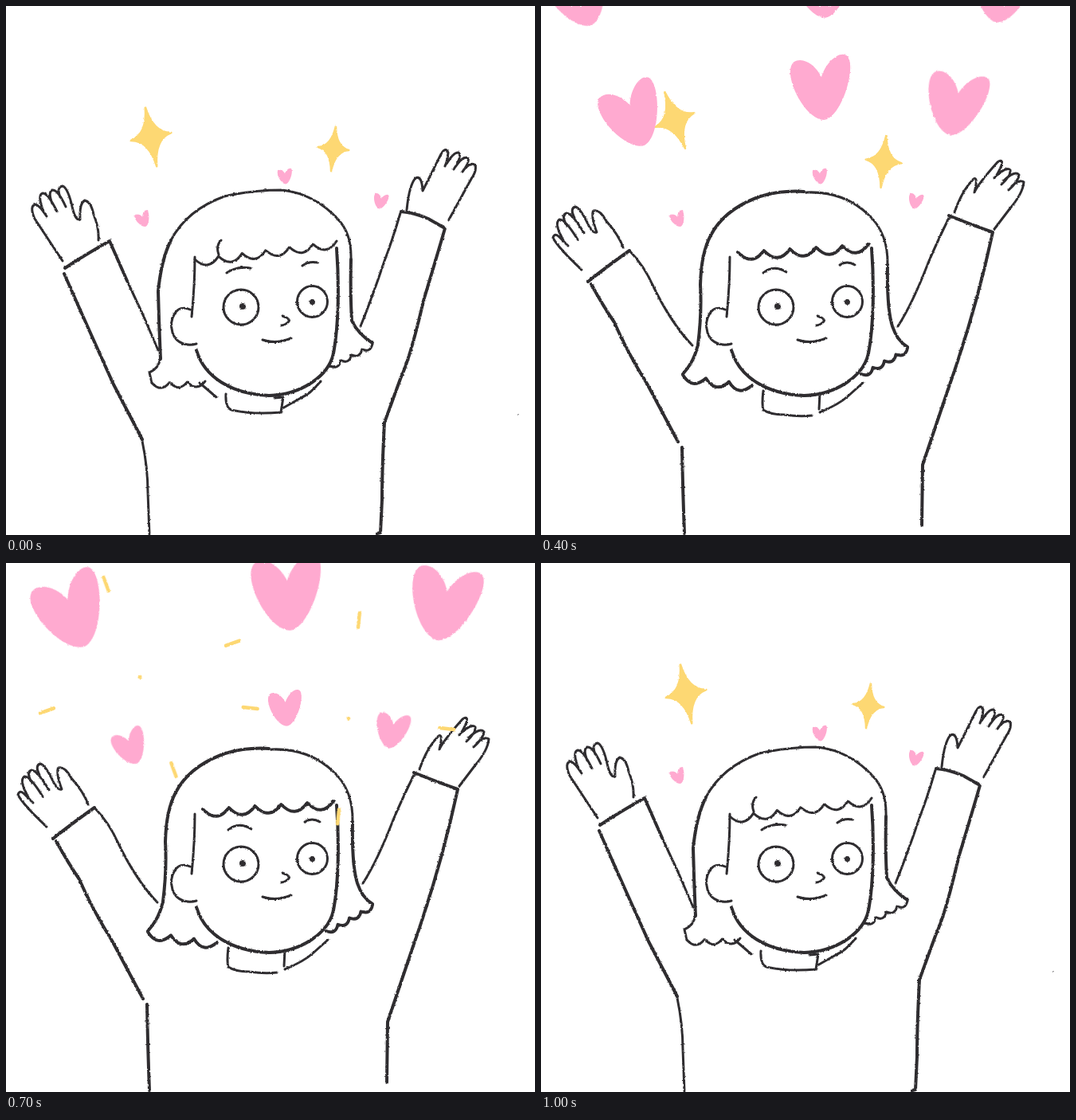
An HTML page for the animation above (1100 ms loop, 664 by 664 pixels).

```html
<!DOCTYPE html>
<html lang="en">
<head>
<meta charset="utf-8">
<title>Cheering with hearts and stars</title>
<style>
html, body { margin: 0; width: 100%; height: 100%; overflow: hidden; background: #fff; }
svg { display: block; width: 100vw; height: 100vh; }
.ink { fill: none; stroke: #2f2d30; stroke-width: 3; stroke-linecap: round; stroke-linejoin: round; }
.bold { stroke-width: 4; }
.pupil { fill: #2f2d30; stroke: none; }
.heart { fill: #ffaad0; }
.star { fill: #fdd873; stroke: #fdd873; stroke-width: 2.5; stroke-linejoin: round; }
.ray { stroke: #fdd873; stroke-width: 4.5; stroke-linecap: round; }
</style>
</head>
<body>
<svg viewBox="0 0 664 664">
  <filter id="rough" filterUnits="userSpaceOnUse" x="0" y="0" width="664" height="664" color-interpolation-filters="sRGB">
    <feTurbulence type="fractalNoise" baseFrequency=".35" numOctaves="2" seed="4"/>
    <feDisplacementMap in="SourceGraphic" scale="2.4" xChannelSelector="R" yChannelSelector="G"/>
  </filter>
  <g filter="url(#rough)">
    <g class="ink">
      <path d="M237 315Q237 350 233 390M231 381C214 373 204 393 209 410C214 425 229 427 239 424"/>
      <path class="bold" d="M239 432C249 466 283 487 330 489C370 488 405 465 411 436C418 400 418 345 415 304"/>
      <ellipse cx="295" cy="378" rx="22" ry="22"/><ellipse cx="384.500" cy="371" rx="19" ry="19.500"/>
      <circle class="pupil" cx="297" cy="377" r="4"/><circle class="pupil" cx="384.500" cy="371.500" r="3.500"/>
      <path d="M347 389Q357 393 355 396Q350 401 345 401M322 419Q338 425 358 417"/>
    </g>
    <g class="ink pose">
      <!-- hair and brows -->
      <path class="bold" d="M194 443Q192 400 191 358Q195 318 207 294M433 318Q432 360 434 395Q442 412 460 423"/>
      <path d="M207 294Q227 256 274 239Q308 231 347 231Q388 236 417 268Q434 286 433 318"/>
      <path d="M194 441Q192 455 180 460L183 473M267 312Q263 301 270 294M277 335Q290 326 307 329M372 326Q380 320 391 322"/>
      <path class="scallop" data-edge="237 318 415 295 6"/>
      <path class="scallop" data-edge="183 473 250 471 3"/>
      <path class="scallop" data-edge="407 452 460 424 4"/>
      <path d="M243 473L264 491M276 487Q275 504 283 507Q310 513 345 510L348 491L337 492M347 505L370 492Q382 487 395 471"/>
      <!-- arms and body -->
      <path d="M71 320L36 267Q29 251 37 249Q42 250 51 264M47 258Q39 237 46 235Q53 235 64 258M58 248Q52 232 59 231Q66 232 75 252M68 240Q63 227 71 226Q78 228 84 256Q88 270 93 268Q92 247 99 244Q107 246 110 262Q117 278 116 294"/>
      <path class="bold" d="M74 329Q98 313 130 295L152 345M73 336Q102 402 135 475L171 544"/>
      <path d="M152 345L173 390Q184 416 191 432M171 546Q178 580 178 610L180 663"/>
      <path d="M503 256Q506 225 514 216Q522 212 523 232Q533 212 546 186Q552 176 555 184Q554 195 551 201M553 198Q562 183 568 184Q573 188 562 205M564 202Q574 187 580 191Q582 196 573 208M575 205Q584 195 589 200Q591 207 584 217L556 268"/>
      <path class="bold" d="M496 258Q511 259 530 267L551 279Q540 317 524 370Q508 440 495 468L475 523Q472 580 472 620L470 661L466 662"/>
      <path d="M495 260Q484 297 475 320Q460 365 445 402"/>
      <circle class="pupil" cx="643" cy="513" r=".8"/>
    </g>
    <g class="ink pose">
      <!-- hair and brows -->
      <path class="bold" d="M178 462Q192 447 197 425Q202 385 200 350Q201 310 213 288Q230 255 275 239Q303 231 330 233M435 325Q434 380 441 402Q447 420 460 428"/>
      <path d="M333 234Q380 232 411 262Q436 285 435 325M279 335Q292 324 308 334M375 325Q384 319 394 325"/>
      <path class="scallop bold" data-edge="247 309 411 299 5"/>
      <path class="scallop bold" data-edge="178 463 265 476 3"/>
      <path class="scallop bold" data-edge="402 462 460 429 4"/>
      <path d="M279 483Q277 500 279 507Q288 513 305 513Q325 516 340 514M350 486L349 506M350 510Q374 500 385 490L404 473"/>
      <!-- arms and body -->
      <path d="M51 331Q22 304 15 291Q17 284 23 290L34 301M28 294Q16 273 23 268Q30 267 46 293M32 275Q25 262 32 260Q39 260 54 285M42 266Q36 254 43 252Q50 254 60 276Q66 286 70 284Q62 262 66 257Q74 255 82 270Q98 288 103 303"/>
      <path class="bold" d="M59 346Q80 329 111 307M63 349Q77 375 92 397Q108 434 133 474L172 547M177 554Q178 610 180 662"/>
      <path d="M111 307Q130 327 140 350Q163 398 190 426"/>
      <path d="M519 259Q528 232 543 217Q549 214 544 234Q548 224 573 196Q580 191 578 200Q573 212 569 216M573 212Q585 201 589 206Q590 213 578 224M581 219Q595 206 600 212Q599 220 587 231M591 226Q601 217 606 221Q605 235 588 255L569 280"/>
      <path class="bold" d="M512 263Q536 273 567 284Q546 382 512 478L479 576L478 652"/>
      <path d="M513 264Q493 305 485 325Q466 374 448 402"/>
    </g>
    <g id="fx"></g>
  </g>
</svg>
<script>
const STEP = 100, STEPS = 11;
const POSES = [0, 1, 1, 0, 1];

// Every second step each column releases a heart that travels from x0,y0 to x1,y1
const COLUMNS = [
  { x0: 172, y0: 268, x1: 48, y1: -14, tilt: -20 },
  { x0: 350, y0: 214, x1: 353, y1: -26, tilt: -4 },
  { x0: 470, y0: 245, x1: 578, y1: -20, tilt: 11 }
];
const TRAVEL = [0, .13, .46, .73, 1];
const SIZE = [19, 44, 79, 92, 82];

// Two bursts, each a pair of stars that grow and then break into rays
const BURSTS = [
  { from: 0, stars: [{ x: 182, y: 164, tilt: -11, scale: 1 }, { x: 411, y: 179, tilt: 6, scale: .75 }] },
  { from: 4, stars: [{ x: 168, y: 143, tilt: -20, scale: 1 }, { x: 430, y: 195, tilt: 6, scale: .87 }] }
];
const RADIUS = [38, 68, 10, 2];
const RAYS = { 2: [62, 112], 3: [115, 133], 4: [127, 134] };

const lerp = (a, b, t) => a + (b - a) * t;

function scallop(x0, y0, x1, y1, count) {
  const dx = (x1 - x0) / count, dy = (y1 - y0) / count;
  let d = `M${x0} ${y0}`;
  for (let i = 0; i < count; i++) d += `q${dx / 2 - dy * .6} ${dy / 2 + dx * .6} ${dx} ${dy}`;
  return d;
}

function heart({ x0, y0, x1, y1, tilt }, age) {
  const x = lerp(x0, x1, TRAVEL[age]), y = lerp(y0, y1, TRAVEL[age]), r = SIZE[age] / 2;
  return `<path class="heart" transform="translate(${x} ${y}) rotate(${tilt}) scale(${r})"
    d="M.04-.36C-.12-.76-.5-1.06-.8-.9C-1.22-.6-.6.96.03 1C.6.96 1.2-.65.9-.98C.66-1.18.2-.8.04-.36"/>`;
}

function star({ x, y, tilt, scale }, phase) {
  let shape = '';
  if (phase in RADIUS) {
    const h = RADIUS[phase] * scale, w = h * .68, c = h * .1;
    shape += `<path class="star" d="M0 ${-h}Q${c} ${-c} ${w} 0Q${c} ${c} 0 ${h}Q${-c} ${c} ${-w} 0Q${-c} ${-c} 0 ${-h}"/>`;
  }
  if (phase in RAYS) {
    const [near, far] = RAYS[phase];
    for (let turn = 0; turn < 360; turn += 90)
      shape += `<path class="ray" transform="rotate(${turn})" d="M0 ${-near}V${-far}"/>`;
  }
  return `<g transform="translate(${x} ${y}) rotate(${tilt})">${shape}</g>`;
}

function effects(step) {
  const burst = BURSTS[step < BURSTS[1].from ? 0 : 1];
  let out = burst.stars.map(s => star(s, step - burst.from)).join('');
  for (let age = step % 2; age <= step && age < SIZE.length; age += 2)
    out += COLUMNS.map(column => heart(column, age)).join('');
  return out;
}

const poses = document.querySelectorAll('.pose');
const fx = document.getElementById('fx');
document.querySelectorAll('.scallop').forEach(el =>
  el.setAttribute('d', scallop(...el.dataset.edge.split(' ').map(Number))));

let shown = -1;
function show(index) {
  poses.forEach((el, i) => el.style.display = i === POSES[index % POSES.length] ? '' : 'none');
  fx.innerHTML = effects(index % (STEPS - 1));
  shown = index;
}

const start = performance.now();
function tick() {
  const index = Math.floor((performance.now() - start) / STEP) % STEPS;
  if (index !== shown) show(index);
  requestAnimationFrame(tick);
}
tick();
</script>
</body>
</html>
```
